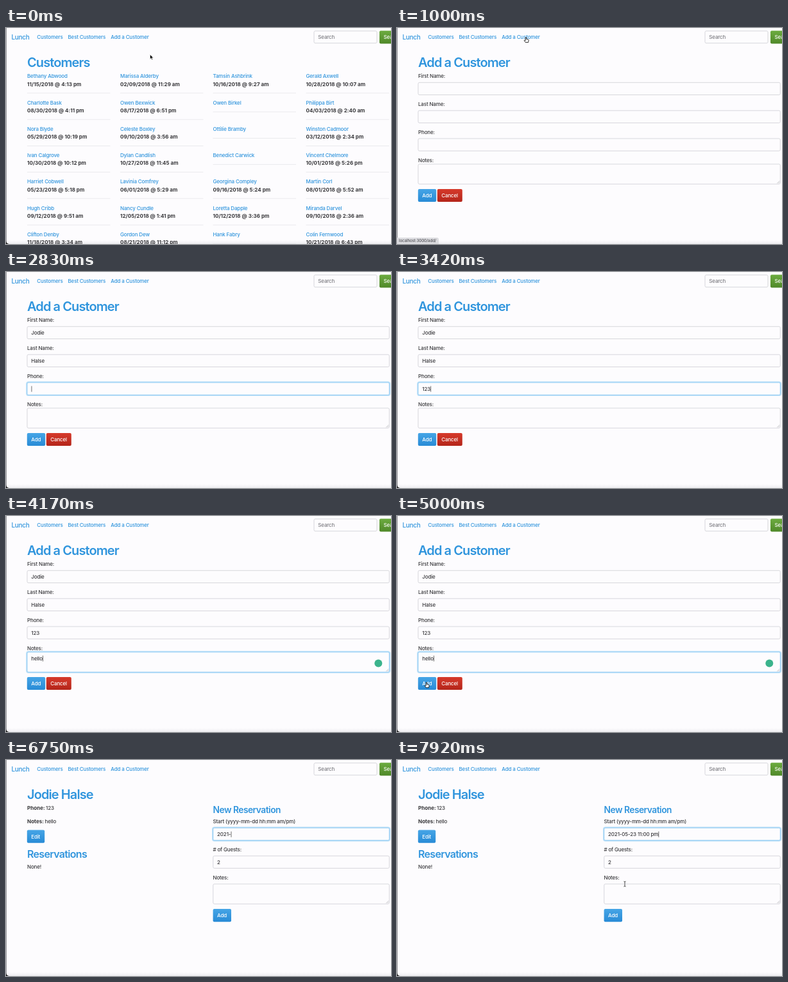
These frames come from a looping animation (600 by 338 pixels, 8000 ms). An HTML page:

```html
<!DOCTYPE html>
<html lang="en">
<head>
<meta charset="utf-8">
<title>Lunch</title>
<style>
html, body { margin: 0; width: 100%; height: 100%; overflow: hidden; background: #fdfcfe; }
svg { display: block; width: 600px; height: 338px; }
text {
  font: 450 8px Inter, "Open Sans", sans-serif;
  font-optical-sizing: none;
  letter-spacing: -.02em;
  fill: #38383b;
  white-space: pre;
}
.link, .h1, .h2, .h3, .brand { fill: #3095dd; }
.h1 { font-size: 20px; font-weight: 600; letter-spacing: -.046em; }
.h2 { font-size: 16px; font-weight: 600; letter-spacing: -.042em; }
.h3 { font-size: 13.8px; font-weight: 600; letter-spacing: -.037em; }
.brand { font-size: 10px; letter-spacing: -.03em; }
.bold { font-size: 8.05px; font-weight: 700; letter-spacing: .003em; }
.hint { fill: #7d7d82; }
.white { fill: #fff; }
.status { font-size: 6.2px; fill: #55555a; }
</style>
</head>
<body>
<svg viewBox="0 0 600 338">
  <defs>
    <linearGradient id="blue" x2="0" y2="1"><stop stop-color="#46a5e6"/><stop offset="1" stop-color="#288bd6"/></linearGradient>
    <linearGradient id="red" x2="0" y2="1"><stop stop-color="#d63a2b"/><stop offset="1" stop-color="#b4251a"/></linearGradient>
    <linearGradient id="green" x2="0" y2="1"><stop stop-color="#6cab3f"/><stop offset="1" stop-color="#50892a"/></linearGradient>
    <linearGradient id="foot" x2="0" y2="1"><stop stop-color="#fdfcfe"/><stop offset="1" stop-color="#ededf0"/></linearGradient>
  </defs>
  <g id="stage"></g>
</svg>
<script>
const FPS = 12, FRAMES = 96;
const stage = document.getElementById('stage');
const first = 'Jodie', last = 'Halse', phone = '123', notes = 'hello';
const columns = [33, 178, 322.5, 467.5];

// name, then date and time of the latest visit if there is one
const customers = `Bethany Abwood,11/15,4:13 pm
Marissa Alderby,02/09,11:29 am
Tamsin Ashbrink,10/16,9:27 am
Gerald Axwell,10/28,10:07 am
Charlotte Bask,08/30,4:11 pm
Owen Bexwick,08/17,6:51 pm
Owen Birkel
Philippa Birt,04/03,2:40 am
Nora Blyde,05/29,10:19 pm
Celeste Boxley,09/10,3:56 am
Ottilie Bramby
Winston Cadmoor,03/12,2:34 pm
Ivan Calgrove,10/30,10:12 pm
Dylan Candlish,10/27,11:45 am
Benedict Carwick
Vincent Chelmore,10/01,5:26 pm
Harriet Cobwell,05/23,5:18 pm
Lavinia Comfrey,06/01,5:29 am
Georgina Compley,09/16,5:24 pm
Martin Corl,08/01,5:52 am
Hugh Cribb,09/12,9:51 am
Nancy Cundle,12/05,1:41 pm
Loretta Dapple,10/12,3:36 pm
Miranda Darvel,09/10,2:36 am
Clifton Denby,11/18,3:34 am
Gordon Dew,08/21,11:12 pm
Hank Fabry
Colin Fernwood,10/21,6:43 pm`.split('\n').map(line => line.split(','));

// frame, x, y, shape shown from that frame on
const pointerKeys = [
  [0, 224.5, 41.5, 'arrow'], [6, 203, 17, 'hand'], [8, 201, 14, 'hand'],
  [13, 201, 14, 'arrow'], [17, 150, 94, 'beam'], [20, 150, 94, ''],
  [52, 150, 94, 'arrow'], [58, 46, 260, 'hand'], [63, 46, 260, 'arrow'],
  [69, 105.7, 247.3, 'arrow'], [75, 372, 116, 'beam'], [78, 372, 116, ''],
  [92, 372, 116, 'beam'], [95, 355, 194, 'beam'], [96, 355, 194, 'beam']
];

const shapes = {
  '': '',
  arrow: '<path d="M0 0V7.2L1.7 5.7 2.8 8.2 4 7.7 2.9 5.3H5.2Z" fill="#000" stroke="#fff" stroke-width=".6"/>',
  hand: '<path d="M-.8 .8Q0-.5.8.8V3.4L3.6 4.1Q4.3 4.3 4.2 5.2L3.5 8.6H-.7L-2.8 5.6Q-2.8 4.4-.8 5.5Z" fill="#fff" stroke="#000" stroke-width=".8"/>',
  beam: '<path d="M-1.6-4Q0-4 0-3Q0-4 1.6-4M0-3V3M-1.6 4Q0 4 0 3Q0 4 1.6 4" fill="none" stroke="#222" stroke-width=".8"/>'
};

const text = (x, y, str, cls = '') => `<text x="${x}" y="${y}" class="${cls}">${str}</text>`;

const rect = (x, y, w, h, fill, extra = '') =>
  `<rect x="${x}" y="${y}" width="${w}" height="${h}" fill="${fill}" ${extra}/>`;

const button = (x, y, w, label, color) =>
  rect(x - .2, y - .4, w + .4, 20.2, `url(#${color})`, 'rx="2"') + text(x + 6.3, y + 12.6, label, 'white');

function field(x, y, w, h, value, focused, hint = '') {
  const glow = focused
    ? rect(x - .7, y - .7, w + 1.4, h + 1.4, 'none', 'rx="2.8" stroke="#b9dff8" stroke-width="2.2"') : '';
  const box = rect(x, y, w, h, '#fdfcfe', `rx="2" stroke="${focused ? '#8fcaf2' : '#d3d3d8'}" stroke-width=".9"`);
  const grip = h > 25
    ? `<path d="M${x + w - 5} ${y + h - 1}l4-4m-2 4l2-2" stroke="#a5a5aa" stroke-width=".6"/>` : '';
  const content = value || focused || !hint
    ? `<text x="${x + 6.3}" y="${y + 12.8}"${focused ? ' id="active"' : ''}>${value}</text>`
    : text(x + 6.3, y + 12.6, hint, 'hint');
  return glow + box + grip + content;
}

const typed = (str, n, start, step = 1) =>
  str.slice(0, Math.max(0, Math.floor((n - start) / step) + 1));

function navbar() {
  return text(8.5, 17.8, 'Lunch', 'brand') + text(48.3, 17.4, 'Customers', 'link') +
    text(96.5, 17.4, 'Best Customers', 'link') + text(163.3, 17.4, 'Add a Customer', 'link') +
    field(480, 4.7, 98, 19, '', false, 'Search') + button(582.2, 4.7, 42, 'Search', 'green');
}

function listPage() {
  return text(33, 60.8, 'Customers', 'h1') + customers.map(([name, day, time], i) => {
    const x = columns[i % 4], y = 78.3 + 41.25 * Math.floor(i / 4);
    return text(x, y, name, 'link') +
      (day ? text(x, y + 12.2, `${day}/2018 @ ${time}`, 'bold') : '') +
      rect(x, y + (day ? 23.2 : 11.2), 129.5, .8, '#e6e6e9');
  }).join('');
}

function formPage(n) {
  const focus = [17, 28, 34, 42].filter(start => n >= start).length;
  return text(33, 60.8, 'Add a Customer', 'h1') +
    text(33, 78.4, 'First Name:') + field(33, 85.3, 564.3, 19.3, typed(first, n, 21), focus === 1) +
    text(33, 122.1, 'Last Name:') + field(33, 129.2, 564.3, 19.3, typed(last, n, 29), focus === 2) +
    text(33, 165.9, 'Phone:') + field(33, 173, 564.3, 19.3, typed(phone, n, 37), focus === 3) +
    text(33, 209.7, 'Notes:') + field(33, 213, 564.3, 31.2, typed(notes, n, 44), focus === 4) +
    (focus === 4 ? '<circle cx="580.3" cy="230.4" r="6" fill="#3bb38c"/>' : '') +
    button(33, 252.3, 28, 'Add', 'blue') + button(63, 252.3, 38.6, 'Cancel', 'red');
}

function detailPage(n) {
  return text(33, 60.8, `${first} ${last}`, 'h1') +
    text(33, 78.4, 'Phone:', 'bold') + text(62, 78.4, phone) +
    text(33, 98.9, 'Notes:', 'bold') + text(60.5, 98.9, notes) +
    button(33, 110, 27, 'Edit', 'blue') +
    text(33, 153.4, 'Reservations', 'h2') + text(33, 170.2, 'None!') +
    text(322.5, 82.8, 'New Reservation', 'h3') +
    text(322.5, 99.4, 'Start (yyyy-mm-dd hh:mm am/pm)') +
    field(322.8, 106.3, 274.5, 19.3, typed('2021-05-23 11:00 pm', n, 78, .68), n >= 76, 'yyyy-mm-dd hh:mm am/pm') +
    text(322.5, 143, '# of Guests:') + field(322.8, 150.1, 274.5, 19.3, '2', false) +
    text(322.5, 186.8, 'Notes:') + field(322.8, 194, 274.5, 31.2, '', false) +
    button(322.8, 233.5, 28, 'Add', 'blue');
}

function pointer(n) {
  const i = pointerKeys.findIndex(key => key[0] > n);
  const [n0, x0, y0, shape] = pointerKeys[i - 1], [n1, x1, y1] = pointerKeys[i];
  const p = (n - n0) / (n1 - n0), e = p * p * (3 - 2 * p);
  return `<g transform="translate(${x0 + (x1 - x0) * e} ${y0 + (y1 - y0) * e})">${shapes[shape]}</g>`;
}

function windowEdge() {
  return rect(0, 332, 600, 6, 'url(#foot)') + rect(0, 0, .9, 338, '#8b8b90') +
    '<path d="M0 333Q.7 337.3 5 338H0Z" fill="#222"/>';
}

const statusBar = () =>
  '<path d="M0 328H62Q65 328 65 331V338H0Z" fill="#dcdce0"/>' + text(3, 335.4, 'localhost:3000/add/', 'status');

function render(n) {
  const page = n < 9 ? listPage() : n < 63 ? formPage(n) : detailPage(n);
  stage.innerHTML = rect(0, 0, 600, 338, '#fdfcfe') + windowEdge() + page + navbar() +
    (n >= 6 && n < 14 ? statusBar() : '') + pointer(n);
  const active = document.getElementById('active');
  if (active) {
    const x = +active.getAttribute('x') + active.getComputedTextLength() + .3;
    active.insertAdjacentHTML('afterend', rect(x, active.getAttribute('y') - 7.3, .7, 9, '#333'));
  }
}

let shown = -1;
function tick() {
  const n = Math.floor((performance.now() + 4) * FPS / 1000) % FRAMES;
  if (n !== shown) render(shown = n);
  requestAnimationFrame(tick);
}
tick();
</script>
</body>
</html>
```
